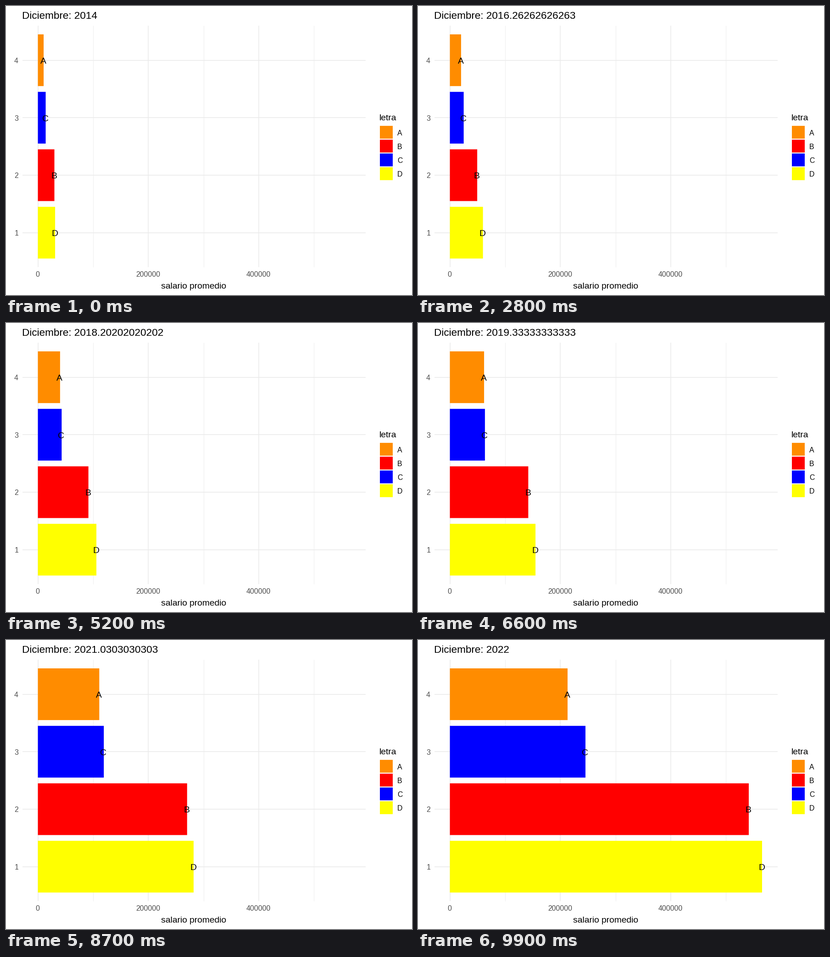
Write a matplotlib script that moves like this. It is 885 px wide and 632 px high and loops after 10 s.

```python
import numpy as np
import matplotlib.pyplot as plt
from matplotlib.animation import FuncAnimation
from matplotlib.patches import Rectangle

W, H, DPI = 885, 632, 100
FRAMES, INTERVAL = 100, 100
FIRST, LAST = 2014, 2022

# Panel geometry in pixels
LEFT, RIGHT, TOP, BOTTOM = 35.5, 784, 43.2, 571.2
X0, PER_K = 69.5, 1.2038
ROW0, ROW_STEP, BAR_H = 118.6, 125.7, 113.1
GRID, AXIS_GREY = "#EBEBEB", "#4D4D4D"

# Share of the total log growth gained in each year, common to all rows
RAISES = [0.087, 0.091, 0.079, 0.120, 0.1375, 0.086, 0.1595, 0.240]

# Letter, colour, first and last salary in thousands, mid-way lead, early lead
ROWS = [
    ("A", "#FF8C00", 10.4, 213.1, 0.042, -0.012),
    ("C", "#0000FF", 14.1, 245.5, -0.012, 0.011),
    ("B", "#FF0000", 29.9, 541.2, -0.020, -0.011),
    ("D", "#FFFF00", 31.2, 565.3, 0.020, 0.011),
]

# Each year is reached on a whole frame
YEARS = np.linspace(0, 1, LAST - FIRST + 1)
KEYS = np.round(YEARS * (FRAMES - 1))
GROWTH = np.concatenate([[0], np.cumsum(RAISES)])

plt.rcParams["font.family"] = "Liberation Sans"
fig = plt.figure(figsize=(W / DPI, H / DPI), dpi=DPI, facecolor="white")
ax = fig.add_axes([0, 0, 1, 1])
ax.set_xlim(0, W)
ax.set_ylim(H, 0)
ax.axis("off")


def px(n):
    return n * 72 / DPI


def text(x, y, s, size, color="black", ha="left"):
    return ax.text(x, y, s, fontsize=px(size), color=color, ha=ha, va="baseline", zorder=5)


def line(xs, ys, width):
    ax.plot(xs, ys, color=GRID, lw=px(width), solid_capstyle="butt", zorder=1)


def box(x, y, w, h, color):
    return ax.add_patch(Rectangle((x, y), w, h, facecolor=color, linewidth=0,
                                  snap=False, zorder=3))


def salary_x(k):
    return X0 + k * PER_K


def yearly(start, end, lead, early):
    """Compound growth from start to end, bent by how far the row runs ahead."""
    bend = lead * np.sin(np.pi * YEARS) + early * np.sin(2 * np.pi * YEARS)
    return start * (end / start) ** (GROWTH + bend)


for k in (100, 300, 500):
    line([salary_x(k)] * 2, [TOP, BOTTOM], 0.9)
for k in (0, 200, 400):
    line([salary_x(k)] * 2, [TOP, BOTTOM], 1.6)
    text(salary_x(k) - 0.5, 592.5, str(k * 1000), 15.7, AXIS_GREY, "center")

bars, labels, salaries = [], [], []
for r, (name, color, *shape) in enumerate(ROWS):
    y = ROW0 + r * ROW_STEP
    line([LEFT, RIGHT], [y, y], 1.6)
    text(27, y + 6.3, str(len(ROWS) - r), 15.7, AXIS_GREY, "right")
    bars.append(box(X0, y - BAR_H / 2, 0, BAR_H, color))
    labels.append(text(X0, y + 7.4, name, 19.3, ha="center"))
    salaries.append(yearly(*shape))

text(409.5, 618, "salario promedio", 19.3, ha="center")
title = text(35.3, 28, "", 22.5)

text(814, 249.5, "letra", 19.3)
for i, (name, color, *_) in enumerate(sorted(ROWS)):
    y = 276.1 + i * 30.24
    box(815, y - 14, 28, 28, color)
    text(853, y + 6.5, name, 15.7)


def update(i):
    year = FIRST + (LAST - FIRST) * i / (FRAMES - 1)
    title.set_text(f"Diciembre: {year:.15g}")
    for bar, label, values in zip(bars, labels, salaries):
        end = salary_x(np.interp(i, KEYS, values))
        bar.set_width(end - X0)
        label.set_x(end - 1)
    return [title, *bars, *labels]


anim = FuncAnimation(fig, update, frames=FRAMES, interval=INTERVAL,
                     repeat=True, repeat_delay=0, blit=False)
plt.show()
```
